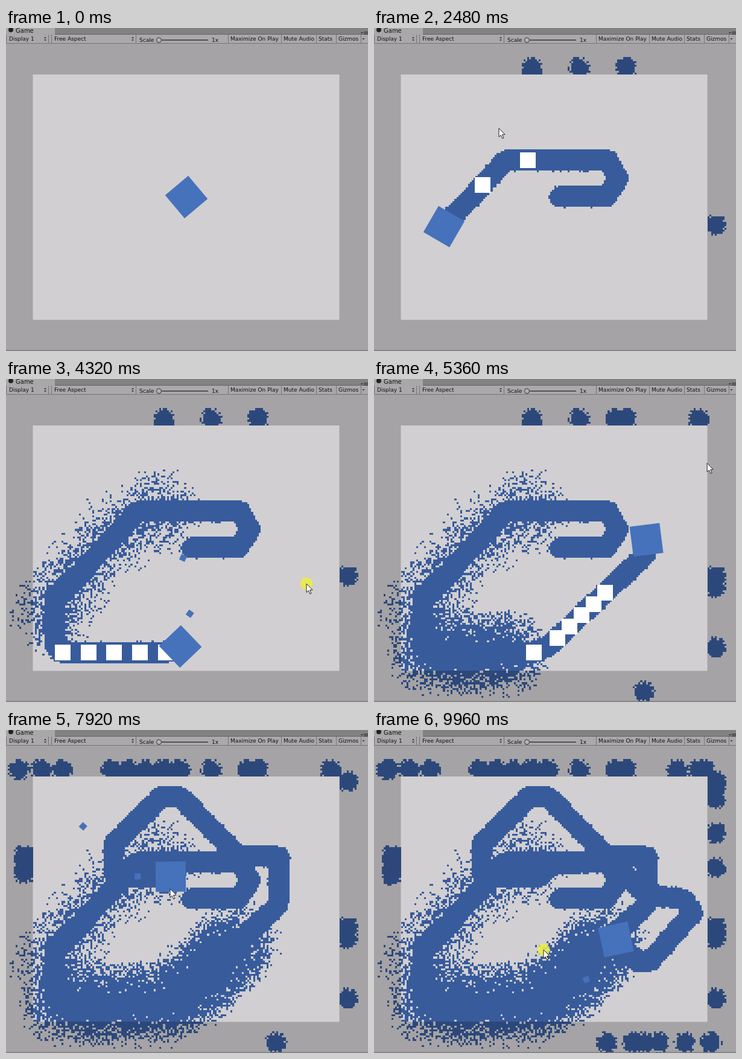
Recreate the animation shown at these times as an HTML page with a canvas. Size 600 by 535 pixels, loop 10000 ms.

```html
<!DOCTYPE html>
<html lang="en">
<head>
<meta charset="utf-8">
<title>Paint trail</title>
<style>
html, body { margin: 0; width: 100%; height: 100%; overflow: hidden; background: #a5a3a5; }
canvas { display: block; width: 600px; height: 535px; }
</style>
</head>
<body>
<canvas id="stage" width="600" height="535"></canvas>
<script>
const ctx = document.getElementById('stage').getContext('2d');
const LOOP = 10000, START = 380;
const ARENA = { x: 44.5, y: 77, w: 508, h: 406.4 };
const CELL = 3.175, COLS = 190, ROWS = 162;
const GRID_X = ARENA.x - 15 * CELL, GRID_Y = ARENA.y - 17 * CELL;
const BULLET_SPEED = 0.45, CLICK = 80, FUSE = 1350, BLAST = 78, TRAIL = 17.2;
const PLAYER = '#4672bc';

// Each leg is walked at constant speed and ends at the given time.
const legs = [
  { end: 1240, via: [[386, 279], [405, 250], [388, 219], [364, 219]] },
  { end: 2480, via: [[218, 219], [116, 329]] },
  { end: 4320, via: [[80, 370], [80, 440], [92, 453], [265, 453], [289, 443]] },
  { end: 6440, via: [[451, 290], [453, 210], [385, 210], [294, 115]] },
  { end: 7920, via: [[284, 110], [258, 110], [178, 190], [178, 232], [205, 243], [273, 243]] },
  { end: 9960, via: [[300, 221], [395, 219], [448, 272], [512, 280], [528, 303], [458, 383], [435, 383], [401, 347]] }
];

// time, x, y
const pointer = [
  [400, 440, 545], [650, 465, 320], [1240, 389, 128], [2080, 210, 160], [2480, 207, 166],
  [3100, 550, 260], [4320, 498, 339], [5300, 555, 140], [6440, 195, 73], [7300, 220, 150],
  [7920, 272, 263], [8450, 570, 130], [9080, 540, 415], [9960, 281, 364]
];

// first shot, gap, count, first and last target measured clockwise around the walls
const volleys = [
  [540, 0, 1, 796, 796], [975, 320, 3, 388, 232], [3935, 209, 2, 372, 508],
  [4290, 350, 2, 815, 915], [4560, 0, 1, 1107, 1107], [5400, 50, 2, 1805, 555],
  [5638, 386, 2, 1834, 1817], [6325, 125, 3, -8, 63], [6640, 95, 5, 145, 258],
  [7645, 190, 2, -5, 1802], [8000, 100, 3, 472, 563], [8300, 100, 3, 583, 698],
  [8700, 0, 1, 808, 808], [9080, 90, 5, 996, 1168], [9767, 163, 2, 1452, 1254]
];

let seed = 7;
function rand() {
  seed = seed + 0x6D2B79F5 | 0;
  let v = Math.imul(seed ^ seed >>> 15, 1 | seed);
  v = v + Math.imul(v ^ v >>> 7, 61 | v) ^ v;
  return ((v ^ v >>> 14) >>> 0) / 4294967296;
}

const linear = k => k;
const smooth = k => k * k * (3 - 2 * k);

function sample(keys, t, ease = linear) {
  let i = 1;
  while (i < keys.length - 1 && keys[i][0] < t) i++;
  const [t0, x0, y0] = keys[i - 1], [t1, x1, y1] = keys[i];
  const k = ease(Math.max(0, Math.min(1, (t - t0) / (t1 - t0))));
  return [x0 + (x1 - x0) * k, y0 + (y1 - y0) * k];
}

function buildRoute() {
  const keys = [[START, 299, 280]];
  for (const { end, via } of legs) {
    let [time, x, y] = keys[keys.length - 1];
    const lengths = via.map(([nx, ny]) => {
      const length = Math.hypot(nx - x, ny - y);
      [x, y] = [nx, ny];
      return length;
    });
    const pace = (end - time) / lengths.reduce((a, b) => a + b);
    via.forEach((point, i) => keys.push([time += lengths[i] * pace, ...point]));
  }
  return keys;
}
const route = buildRoute();
const playerAt = t => sample(route, t);

function wallPoint(p) {
  const left = 30, top = 66, right = 566, bottom = 518;
  const w = right - left, h = bottom - top;
  if (p < w) return [left + p, top];
  if (p < w + h) return [right, top + p - w];
  if (p < 2 * w + h) return [right - (p - w - h), bottom];
  return [left, bottom - (p - 2 * w - h)];
}

const inArena = (x, y) => x > ARENA.x && x < ARENA.x + ARENA.w && y > ARENA.y && y < ARENA.y + ARENA.h;
const cellX = i => Math.round(GRID_X + i * CELL);
const cellY = j => Math.round(GRID_Y + j * CELL);

// Each cell stores the moment it turns blue.
const born = new Float32Array(COLS * ROWS).fill(Infinity);

function paint(cx, cy, reach, birth) {
  const i0 = Math.max(0, Math.floor((cx - reach - GRID_X) / CELL));
  const i1 = Math.min(COLS - 1, Math.ceil((cx + reach - GRID_X) / CELL));
  const j0 = Math.max(0, Math.floor((cy - reach - GRID_Y) / CELL));
  const j1 = Math.min(ROWS - 1, Math.ceil((cy + reach - GRID_Y) / CELL));
  for (let j = j0; j <= j1; j++) for (let i = i0; i <= i1; i++) {
    const x = GRID_X + (i + 0.5) * CELL, y = GRID_Y + (j + 0.5) * CELL;
    const n = j * COLS + i;
    born[n] = Math.min(born[n], birth(Math.hypot(x - cx, y - cy), x, y));
  }
}

for (let t = START + 40; t < LOOP; t += 15) {
  paint(...playerAt(t), 20, d => d < TRAIL || d < TRAIL + 2 && rand() < 0.05 ? t : Infinity);
}

const bullets = [];
for (const [first, gap, count, from, to] of volleys) {
  for (let i = 0; i < count; i++) {
    const start = first + i * gap;
    const [x, y] = playerAt(start);
    const [tx, ty] = wallPoint(from + (to - from) * i / Math.max(1, count - 1));
    const end = start + Math.hypot(tx - x, ty - y) / BULLET_SPEED;
    paint(tx, ty, 20, (d, px, py) =>
      !inArena(px, py) && (d < 14.5 || d < 18.5 && rand() < 0.5) ? end : Infinity);
    bullets.push({ start, end, x, y, angle: Math.atan2(ty - y, tx - x) });
  }
}

// Mines drop faster and in pairs along the bottom and up the slope.
const mines = [];
for (let t = 1698; t < 4960; t += t < 3200 ? 390 : t < 4400 ? 230 : 115) {
  const [x, y] = playerAt(t);
  const end = t + FUSE;
  for (let blasts = t < 3200 ? 1 : 2; blasts > 0; blasts--) {
    paint(x, y, BLAST, d =>
      d < BLAST && rand() < 0.95 * Math.pow(1 - d / BLAST, 1.2) ? end + d * 0.7 : Infinity);
  }
  mines.push({ start: t, end, x, y });
}

function box(color, x, y, w, h) {
  ctx.fillStyle = color;
  ctx.fillRect(x, y, w, h);
}

function square(color, x, y, size, angle = 0) {
  ctx.save();
  ctx.translate(x, y);
  ctx.rotate(angle);
  box(color, -size / 2, -size / 2, size, size);
  ctx.restore();
}

function disc(color, x, y, r) {
  ctx.fillStyle = color;
  ctx.beginPath();
  ctx.arc(x, y, r, 0, Math.PI * 2);
  ctx.fill();
}

function polygon(color, points) {
  ctx.fillStyle = color;
  ctx.beginPath();
  points.forEach(([x, y]) => ctx.lineTo(x, y));
  ctx.closePath();
  ctx.fill();
}

function label(text, x, y = 21, size = 9) {
  ctx.font = size + 'px "DejaVu Sans", sans-serif';
  ctx.fillStyle = '#111';
  ctx.fillText(text, x, y);
}

const divider = x => box('#747274', x, 11, 1, 14);
const arrow = (x, y, dir) => polygon('#333', [[x - 2, y], [x + 2, y], [x, y + 2.5 * dir]]);

function dropdown(text, x, end) {
  label(text, x);
  divider(x - 5);
  divider(end);
  arrow(end - 5, 17, -1);
  arrow(end - 5, 19, 1);
}

function button(text, x) {
  divider(x - 4);
  label(text, x);
}

function drawToolbar() {
  box('#838183', 0, 0, 600, 11);
  box('#a9a7a9', 0, 0, 81, 11);
  box('#666466', 81, 10, 519, 1);
  box('#aaa8aa', 0, 11, 600, 14);
  box('#777577', 0, 25, 600, 1);
  disc('#222', 8, 3, 4);
  label('Game', 16, 8, 10);
  dropdown('Display 1', 5, 70);
  dropdown('Free Aspect', 80, 215);
  label('Scale', 221, 23);
  label('1x', 341, 23);
  button('Maximize On Play', 372);
  button('Mute Audio', 460);
  button('Stats', 518);
  button('Gizmos', 551);
  divider(588);
  arrow(592.5, 17, 1);
  arrow(590, 7, 1);
  for (let y = 6; y <= 10; y += 2) box('#333', 593, y, 7, 1);
  box('#555355', 253, 19, 82, 2);
  disc('#4b494b', 253.5, 20, 4.5);
  disc('#b5b3b5', 253.5, 20, 3.3);
}

function drawPaint(t) {
  for (let j = 0; j < ROWS; j++) for (let i = 0; i < COLS; i++) {
    if (born[j * COLS + i] > t) continue;
    const inside = inArena(GRID_X + (i + 0.5) * CELL, GRID_Y + (j + 0.5) * CELL);
    const x = cellX(i), y = cellY(j);
    box(inside ? '#385b9c' : '#2c487b', x, y, cellX(i + 1) - x, cellY(j + 1) - y);
  }
}

function drawBullets(t) {
  ctx.save();
  ctx.beginPath();
  ctx.rect(ARENA.x, ARENA.y, ARENA.w, ARENA.h);
  ctx.clip();
  for (const { start, end, x, y, angle } of bullets) {
    if (t < start || t >= end) continue;
    const d = (t - start) * BULLET_SPEED;
    square(PLAYER, x + Math.cos(angle) * d, y + Math.sin(angle) * d, 10, angle);
  }
  ctx.restore();
}

function drawPointer(t) {
  if (t < pointer[0][0]) return;
  const [x, y] = sample(pointer, t, smooth);
  if (bullets.some(({ start }) => t >= start && t < start + CLICK)) disc('rgba(236,236,70,.85)', x, y, 10.5);
  const outline = [[0, 0], [0, 14.5], [3.3, 11.5], [5.8, 17], [8, 16], [5.6, 10.6], [10, 10.3]];
  polygon('#fff', outline.map(([dx, dy]) => [x + dx, y + dy]));
  ctx.strokeStyle = '#222';
  ctx.lineWidth = 1;
  ctx.stroke();
}

function draw(t) {
  box('#a5a3a5', 0, 0, 600, 535);
  box('#d1cfd1', ARENA.x, ARENA.y, ARENA.w, ARENA.h);
  drawPaint(t);
  for (const { start, end, x, y } of mines) {
    if (t >= start && t < end) square('#fff', Math.round(x), Math.round(y), 26);
  }
  drawBullets(t);
  const degrees = 50 - 0.138 * Math.max(0, t - START);
  square(PLAYER, ...playerAt(t), 50, degrees * Math.PI / 180);
  box('#6d6b6d', 0, 533.5, 600, 1);
  drawToolbar();
  drawPointer(t);
}

const begin = performance.now();
function tick() {
  const t = (performance.now() - begin) % LOOP;
  draw(Math.floor(t / 40) * 40);
  requestAnimationFrame(tick);
}
tick();
</script>
</body>
</html>
```
